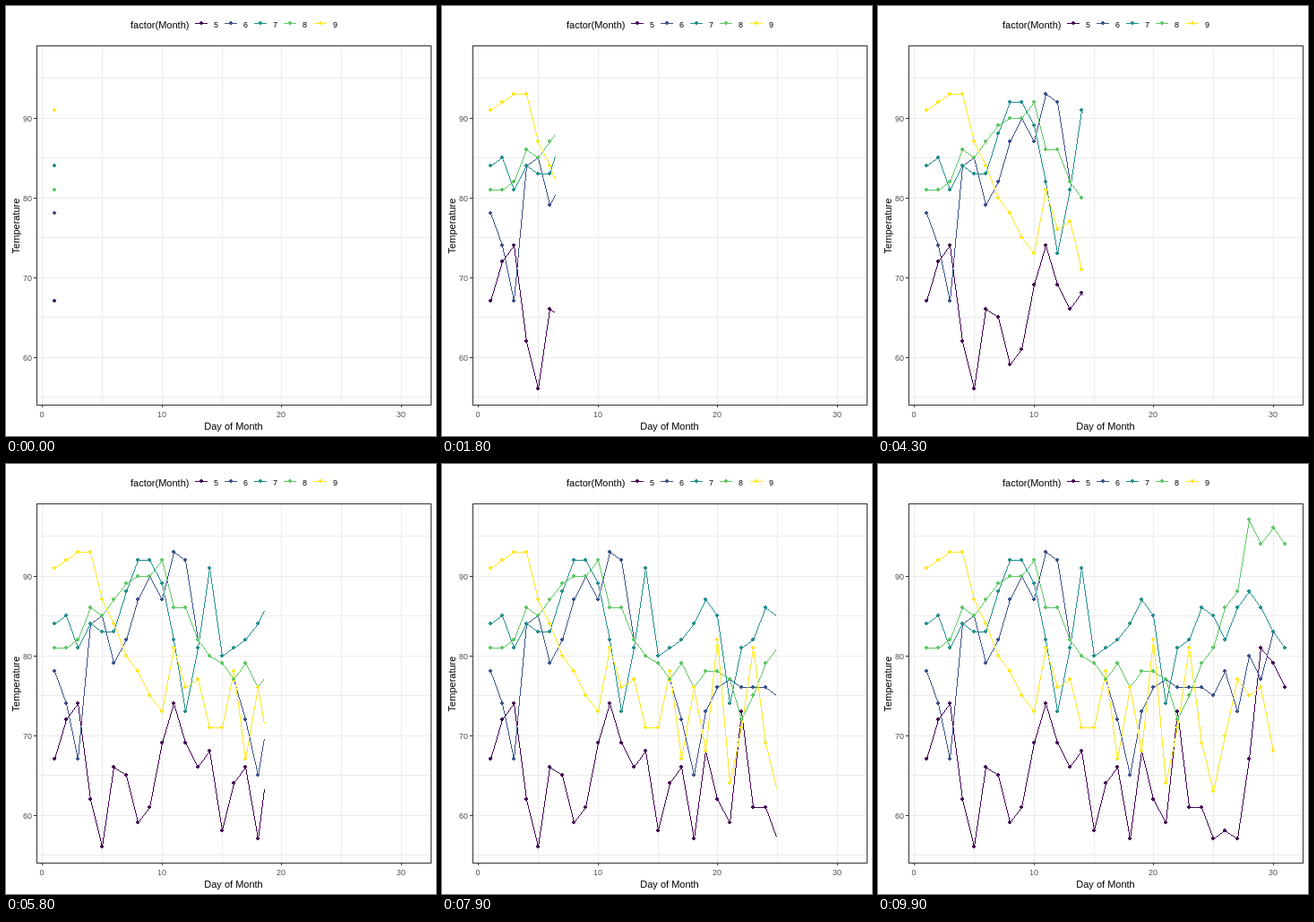
Recreate the animation shown at these times as an HTML page with a canvas. Size 480 by 480 pixels, loop 10 s.

```html
<!DOCTYPE html>
<html lang="en">
<head>
<meta charset="utf-8">
<title>Daily temperature by month</title>
<style>
html, body { margin: 0; width: 100%; height: 100%; overflow: hidden; background: #fff; }
canvas { display: block; width: 480px; height: 480px; }
</style>
</head>
<body>
<canvas id="chart" width="480" height="480"></canvas>
<script>
const ctx = document.getElementById('chart').getContext('2d');
const FRAMES = 100, STEP = 100;
const BOX = { left: 34, right: 474, top: 44, bottom: 445 };
const SANS = '"Liberation Sans", Arial, sans-serif';

// Daily temperatures, one series per month
const may = [67, 72, 74, 62, 56, 66, 65, 59, 61, 69, 74, 69, 66, 68, 58, 64,
  66, 57, 68, 62, 59, 73, 61, 61, 57, 58, 57, 67, 81, 79, 76];
const june = [78, 74, 67, 84, 85, 79, 82, 87, 90, 87, 93, 92, 82, 80, 79, 77,
  72, 65, 73, 76, 77, 76, 76, 76, 75, 78, 73, 80, 77, 83];
const july = [84, 85, 81, 84, 83, 83, 88, 92, 92, 89, 82, 73, 81, 91, 80, 81,
  82, 84, 87, 85, 74, 81, 82, 86, 85, 82, 86, 88, 86, 83, 81];
const august = [81, 81, 82, 86, 85, 87, 89, 90, 90, 92, 86, 86, 82, 80, 79, 77,
  79, 76, 78, 78, 77, 72, 75, 79, 81, 86, 88, 97, 94, 96, 94];
const september = [91, 92, 93, 93, 87, 84, 80, 78, 75, 73, 81, 76, 77, 71, 71, 78,
  67, 76, 68, 82, 64, 71, 81, 69, 63, 70, 77, 75, 76, 68];

const series = [
  { label: '5', color: '#440154', temps: may },
  { label: '6', color: '#3b528b', temps: june },
  { label: '7', color: '#21908c', temps: july },
  { label: '8', color: '#5dc863', temps: august },
  { label: '9', color: '#fde725', temps: september }
];

const px = day => Math.floor(40.7 + day * 13.355);
const py = temp => Math.floor(392.05 - (temp - 60) * 8.9);

function rect(x, y, w, h, color) {
  ctx.fillStyle = color;
  ctx.fillRect(x, y, w, h);
}

function text(str, x, y, size, color, align) {
  ctx.font = size + 'px ' + SANS;
  ctx.fillStyle = color;
  ctx.textAlign = align;
  ctx.fillText(str, x, y);
}

// Crisp one-pixel line without its last pixel
function line(x0, y0, x1, y1) {
  const dx = x1 - x0, dy = y1 - y0;
  const n = Math.max(Math.abs(dx), Math.abs(dy));
  for (let i = 0; i < n; i++) {
    ctx.fillRect(Math.round(x0 + dx * i / n), Math.round(y0 + dy * i / n), 1, 1);
  }
}

function dot(x, y) {
  ctx.fillRect(x - 1, y - 2, 2, 4);
  ctx.fillRect(x - 2, y - 1, 4, 2);
}

function drawPanel() {
  const { left, right, top, bottom } = BOX;
  const w = right - left + 1, h = bottom - top + 1;
  for (let v = 55; v <= 95; v += 5) rect(left, py(v), w, 1, '#ebebeb');
  for (let d = 0; d <= 30; d += 5) rect(px(d), top, 1, h, '#ebebeb');
}

function drawAxes() {
  const { left, right, top, bottom } = BOX;
  ctx.strokeStyle = '#333';
  ctx.lineWidth = 1;
  ctx.strokeRect(left + 0.5, top + 0.5, right - left, bottom - top);
  for (let v = 60; v <= 90; v += 10) {
    rect(left - 3, py(v), 3, 1, '#333');
    text(v, 29, py(v) + 4, 9, '#4d4d4d', 'right');
  }
  for (let d = 0; d <= 30; d += 10) {
    rect(px(d), bottom + 1, 1, 2, '#333');
    text(d, px(d), 459, 9, '#4d4d4d', 'center');
  }
  text('Day of Month', 254, 473, 11, '#000', 'center');
  ctx.save();
  ctx.translate(15, 245.5);
  ctx.rotate(-Math.PI / 2);
  text('Temperature', 0, 0, 11, '#000', 'center');
  ctx.restore();
}

function drawLegend() {
  text('factor(Month)', 139, 25, 11, '#000', 'left');
  series.forEach((s, i) => {
    const x = Math.floor(218.1 + i * 33.28);
    rect(x - 7, 19, 14, 1, s.color);
    dot(x, 19);
    text(s.label, x + 14, 24, 9, '#000', 'left');
  });
}

function drawLine({ temps, color }, now) {
  ctx.fillStyle = color;
  for (let d = 1; d < temps.length && d < now; d++) {
    const part = Math.min(1, now - d);
    const a = temps[d - 1], b = temps[d];
    line(px(d), py(a), px(d + part), py(a + (b - a) * part));
  }
}

function drawDots({ temps, color }, now) {
  ctx.fillStyle = color;
  temps.forEach((v, i) => {
    if (i + 1 <= now + 1e-6) dot(px(i + 1), py(v));
  });
}

function draw(frame) {
  const now = 1 + 30 * frame / (FRAMES - 1);
  rect(0, 0, 480, 480, '#fff');
  drawPanel();
  series.forEach(s => drawLine(s, now));
  series.forEach(s => drawDots(s, now));
  drawAxes();
  drawLegend();
}

const start = performance.now();
let shown = 0;
function tick() {
  const frame = Math.floor((performance.now() - start) / STEP) % FRAMES;
  if (frame !== shown) draw(shown = frame);
  requestAnimationFrame(tick);
}
draw(0);
requestAnimationFrame(tick);
</script>
</body>
</html>
```
